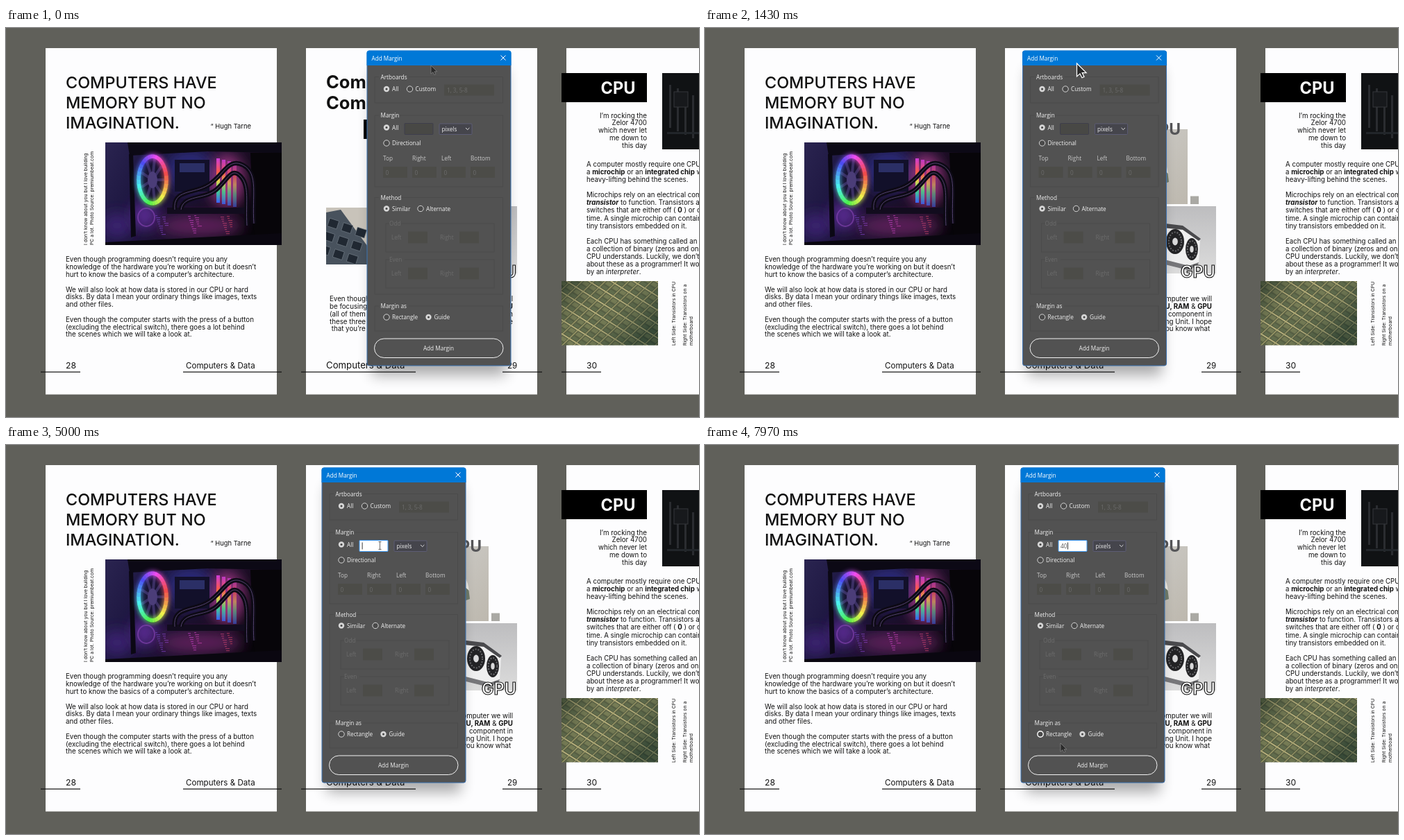
Recreate the animation shown at these times as an HTML page. Size 998 px wide and 561 px high, loop 8 s.

```html
<!DOCTYPE html>
<html lang="en">
<head>
<meta charset="utf-8">
<title>Add Margin</title>
<style>
  html, body { margin: 0; width: 100%; height: 100%; overflow: hidden; background: #60605a; }
  svg { display: block; font-family: Inter, sans-serif; font-optical-sizing: none; fill: #111; }
  .b { font-weight: 700; }
  .i { font-style: italic; }
  .m { font-weight: 500; }
  #dialog text { font-family: "Open Sans", "Noto Sans", sans-serif; font-size: 8.2px; font-weight: 500; fill: #f0f0f0; }
  #dialog text.dim { fill: #6c6c6c; }
  #dialog text.soft { fill: #c8c8c8; }
</style>
</head>
<body>
<svg id="stage" width="998" height="561" viewBox="0 0 998 561">
  <defs>
    <filter id="blur3" x="-50%" y="-50%" width="200%" height="200%"><feGaussianBlur stdDeviation="3"/></filter>
    <filter id="blur10" x="-50%" y="-50%" width="200%" height="200%"><feGaussianBlur stdDeviation="10"/></filter>
    <clipPath id="pcClip"><path d="M143 165H397V313H143z"/></clipPath>
    <clipPath id="boardClip"><path d="M461 259H560V341H461z"/></clipPath>
    <clipPath id="gpuClip"><path d="M600 257H736V354H600z"/></clipPath>
    <linearGradient id="pcBack" x2="1" y2=".3">
      <stop stop-color="#2a2450"/><stop offset=".3" stop-color="#1d1640"/>
      <stop offset=".75" stop-color="#1a0d24"/><stop offset="1" stop-color="#060409"/>
    </linearGradient>
    <linearGradient id="lamp" x2="0" y2="1">
      <stop stop-color="#d23ce0"/><stop offset=".3" stop-color="#ff5a4a"/>
      <stop offset=".5" stop-color="#f5d848"/><stop offset=".72" stop-color="#3fe08a"/>
      <stop offset="1" stop-color="#3b62ff"/>
    </linearGradient>
    <linearGradient id="ramBack" x2="1" y2="1"><stop stop-color="#cfcecb"/><stop offset="1" stop-color="#bdb8ae"/></linearGradient>
    <linearGradient id="gpuBack" x2="0" y2="1"><stop stop-color="#bdbdbf"/><stop offset="1" stop-color="#dcdcdc"/></linearGradient>
    <linearGradient id="waferShade" x2="1" y2=".6">
      <stop stop-color="#1d2a20" stop-opacity=".55"/><stop offset=".45" stop-color="#b9ae78" stop-opacity=".2"/>
      <stop offset="1" stop-color="#25382c" stop-opacity=".5"/>
    </linearGradient>
    <pattern id="wafer" width="12" height="17" patternUnits="userSpaceOnUse" patternTransform="rotate(32) skewX(-14)">
      <path fill="#3a4633" d="M0 0H12V17H0z"/><path fill="#66704d" d="M3 3H11V9H3z"/>
      <path fill="#4b5c42" d="M3 11H11V16H3z"/><path fill="#d0c68c" d="M0 0H12V1.6H0z"/>
      <path fill="#a3a06c" d="M0 0H1.4V17H0z"/>
    </pattern>
  </defs>
  <g id="document"></g>
  <g id="dialog"></g>
  <path id="arrow" d="M0 0V12.2L2.9 9.6 4.8 13.4 6.8 12.5 5 8.8H8.8z" fill="#2a2a2a"/>
  <path id="ibeam" d="M-2-5.5H2M0-5.5V5.5M-2 5.5H2" fill="none" stroke="#666"/>
</svg>
<script>
const $ = id => document.getElementById(id);
const text = (x, y, size, str, attrs = '') => `<text x="${x}" y="${y}" font-size="${size}" ${attrs}>${str}</text>`;
const rect = (x, y, w, h, fill, attrs = '') => `<rect x="${x}" y="${y}" width="${w}" height="${h}" fill="${fill}" ${attrs}/>`;
const line = (x1, x2) => rect(x1, 495.5, x2 - x1, 1.2, '#111');
const lines = (x, y, pitch, size, rows, attrs) =>
  rows.map((row, i) => row && text(x, y + i * pitch, size, row, attrs)).join('');
const sideways = (x, y, str) => text(0, 0, 6.85, str, `transform="translate(${x} ${y}) rotate(-90)"`);
const range = n => [...Array(n).keys()];
const END = 'text-anchor="end"';

// A ring of hue segments, seen at an angle
function rainbowRing(cx, cy, rx, ry, width, hue) {
  const at = a => `${cx + rx * Math.cos(a)} ${cy + ry * Math.sin(a)}`;
  return range(36).map(i => {
    const a = i * Math.PI / 18;
    return `<path d="M${at(a)}L${at(a + .2)}" stroke="hsl(${hue + i * 10} 85% 62%)" stroke-width="${width}"/>`;
  }).join('');
}

function computerPhoto() {
  const glow = (x, y, rx, ry, color) =>
    `<ellipse cx="${x}" cy="${y}" rx="${rx}" ry="${ry}" fill="${color}" filter="url(#blur10)"/>`;
  const tube = d => `<path d="${d}" fill="none" stroke="#0d0a15" stroke-width="6.5"/>
    <path d="${d}" fill="none" stroke="#54436f" stroke-width="1"/>`;
  const sparks = range(45).map(i => rect(215 + i * 47 % 140, 270 + i * 29 % 28, 3 + i % 4, 1.2,
    `hsl(${260 + i * 37 % 110} 50% 50%)`, 'opacity=".65"')).join('');
  const blades = range(9).map(i => {
    const a = i * Math.PI / 4.5;
    return `<path d="M211 219L${211 + 17 * Math.cos(a)} ${219 + 31 * Math.sin(a)}" stroke="#3a2f63" stroke-width="4"/>`;
  }).join('');
  return `<g clip-path="url(#pcClip)">${rect(143, 165, 254, 148, 'url(#pcBack)')}
    ${glow(160, 285, 22, 18, '#3b2470')}${glow(200, 270, 18, 20, '#5a2a92')}
    ${glow(265, 205, 35, 30, '#2c2a78')}${glow(318, 220, 24, 38, '#9a3580')}${glow(280, 285, 60, 14, '#5f235c')}
    <path d="M175 165H397V180L290 178L178 184z" fill="#0c0915"/>
    <path d="M177 182L183 181L187 300L180 302z" fill="#0b0814"/><path d="M352 180H397V313H358z" fill="#070509"/>
    <ellipse cx="211" cy="219" rx="22" ry="38" fill="#191433"/>${blades}
    <g filter="url(#blur3)" opacity=".8">${rainbowRing(211, 219, 20, 34, 8, 20)}</g>
    ${rainbowRing(211, 219, 20, 34, 5.5, 20)}
    <ellipse cx="211" cy="219" rx="7" ry="12" fill="#4b3d78"/>
    <ellipse cx="202" cy="273" rx="12" ry="13" fill="none" stroke="#8a48b8" stroke-width="2" opacity=".6"/>
    ${rect(243, 190, 50, 46, '#12102a')}${rect(250, 195, 36, 13, '#2b2f66')}
    ${[303, 311, 319, 327].map((x, i) => rect(x, 188 + i * 2, 5, 64, 'url(#lamp)', `opacity="${.95 - i * .15}"`)).join('')}
    ${sparks}${rect(232, 259, 112, 9, '#120c1e')}
    ${tube('M243 262C240 232 270 240 292 226S320 186 342 198S354 242 357 282')}
    ${tube('M252 262C255 240 286 248 303 233S325 200 338 214S345 250 347 285')}
    <path d="M143 309L397 296V313H143z" fill="#0a0710"/></g>`;
}

function boardPhoto() {
  const chips = range(9).map(i => rect(458 + i % 3 * 21, 283 + (i / 3 | 0) * 20, 14, 12, '#202832', 'stroke="#77818b" stroke-width=".6"')).join('');
  return `<g clip-path="url(#boardClip)">${rect(461, 259, 99, 82, '#c8c3ba')}
    <path d="M461 266L482 262L540 341H461z" fill="#48525d"/><g transform="rotate(18 490 305)">${chips}</g></g>`;
}

function gpuPhoto() {
  const fan = (x, y, rx, ry) => `<ellipse cx="${x}" cy="${y}" rx="${rx}" ry="${ry}" fill="#232325"/>
    <ellipse cx="${x}" cy="${y}" rx="${rx * .7}" ry="${ry * .75}" fill="none" stroke="#68686b" stroke-width="2" stroke-dasharray="2 2"/>
    <ellipse cx="${x}" cy="${y}" rx="${rx * .3}" ry="${ry * .3}" fill="#d9d9da"/>`;
  return `<g clip-path="url(#gpuClip)">${rect(600, 257, 136, 97, 'url(#gpuBack)')}
    <path d="M630 281L690 288L713 306L711 338L697 343L630 326z" fill="#efefef"/>
    <path d="M630 278L688 285L714 304L711 307L688 291L630 285z" fill="#4a4a4d"/>
    <path d="M630 326L697 343L711 338L709 343L695 349L630 333z" fill="#77777a"/>
    ${fan(677, 308, 13, 18)}${fan(701, 319, 9, 16)}</g>`;
}

function firstPage() {
  const body = ['Even though programming doesn’t require you any', 'knowledge of the hardware you’re working on but it doesn’t',
    'hurt to know the basics of a computer’s architecture.', '', 'We will also look at how data is stored in our CPU or hard',
    'disks. By data I mean your ordinary things like images, texts', 'and other files.', '',
    'Even though the computer starts with the press of a button', '(excluding the electrical switch), there goes a lot behind',
    'the scenes which we will take a look at.'];
  return rect(57, 29, 333, 499.5, '#fdfdfe')
    + lines(86, 87, 29.2, 23.4, ['COMPUTERS HAVE', 'MEMORY BUT NO', 'IMAGINATION.'], 'class="m"')
    + text(294.5, 145, 9.4, '“ Hugh Tarne')
    + computerPhoto()
    + sideways(116.5, 313, 'I don’t know about you but I love building')
    + sideways(125.5, 313, 'PC a lot. Photo Source: premiumbeat.com')
    + lines(86, 337.3, 10.8, 9.75, body)
    + text(86, 490.5, 12.2, '28') + line(50, 107)
    + text(259, 490.5, 11.6, 'Computers &amp; Data') + line(255, 397);
}

function secondPage() {
  return rect(432, 29, 333, 499.5, '#fdfdfe')
    + lines(461, 87, 29.8, 25.5, ['Computer', 'Components'], 'class="b"')
    + rect(515, 132, 60, 28, '#000')
    + boardPhoto()
    + rect(600, 146, 95, 108, 'url(#ramBack)')
    + '<path d="M640 180L666 206L668 222L640 232z" fill="#6f7b6a"/><path d="M655 176L665 200L667 210L655 200z" fill="#eeeae2"/>'
    + text(685, 154, 23, 'CPU', `class="b" ${END} fill="#555558"`)
    + rect(699, 242.5, 12, 11.5, '#aaa9a4')
    + gpuPhoto()
    + text(735, 360, 23.6, 'GPU', `class="b" ${END} fill="#f6f6f6" stroke="#111" stroke-width="1.1"`)
    + lines(466, 394.4, 10.7, 9.75, ['Even though', 'be focusing', '(all of them', 'these three', '&#160;that you’re'])
    + lines(730, 394.4, 10.7, 9.75, ['a computer we will', '<tspan class="b">CPU, RAM</tspan> &amp; <tspan class="b">GPU</tspan>',
      'component in', 'Processing Unit. I hope', 'you know what&#160;'], END)
    + text(461, 490.5, 13.2, 'Computers &amp; Data') + line(425, 590)
    + text(722, 490.5, 11.6, '29') + line(715, 772);
}

function thirdPage() {
  const body = ['A computer mostly require one CPU which', 'a <tspan class="b">microchip</tspan> or an <tspan class="b">integrated chip</tspan> which',
    'heavy-lifting behind the scenes.', '', 'Microchips rely on an electrical component',
    '<tspan class="b i">transistor</tspan> to function. Transistors are tiny', 'switches that are either off ( <tspan class="b">0</tspan> ) or on at any',
    'time. A single microchip can contain many', 'tiny transistors embedded on it.', '',
    'Each CPU has something called an instruction', 'a collection of binary (zeros and ones) that',
    'CPU understands. Luckily, we don’t need to care', 'about these as a programmer! It would be', 'by an <tspan class="i">interpreter</tspan>.'];
  const slots = range(4).map(i => rect(955 + i * 11, 82 + i * 5, 3, 62, '#2a2c30')).join('');
  return rect(807, 29, 200, 499.5, '#fdfdfe')
    + rect(800, 65, 123, 42, '#000') + text(906.5, 94.5, 23.6, 'CPU', `class="b" ${END} fill="#fff"`)
    + lines(923, 129.5, 10.8, 9.75, ['I’m rocking the', 'Zelor 4700', 'which never let', 'me down to', 'this day'], END)
    + rect(945, 65, 60, 110, '#101214') + slots + rect(962, 92, 20, 22, '#17191c', 'stroke="#34363a"')
    + rect(952, 150, 50, 3, '#22262a')
    + lines(836, 199.8, 11.1, 9.7, body)
    + rect(800, 365, 139, 92.5, 'url(#wafer)') + rect(800, 365, 139, 92.5, 'url(#waferShade)')
    + sideways(963.5, 458, 'Left Side: Transistors in CPU')
    + sideways(980, 458, 'Right Side: Transistors on a') + sideways(989, 458, 'motherboard')
    + text(836, 490.5, 12.2, '30') + line(800, 857);
}

// Dialog coordinates are measured from its left edge
const radios = [[28, 88, 'All', 1], [61.5, 88, 'Custom'], [28, 143.5, 'All', 1], [28, 166, 'Directional'],
  [28, 260.5, 'Similar', 1], [77, 260.5, 'Alternate'], [28, 417, 'Rectangle'], [88.5, 417, 'Guide', 1]];

function dialogMarkup() {
  const label = (x, y, str, cls = '') => text(x, y + 3, 8.2, str, `class="${cls}"`);
  const group = (x, y, w, bottom, name, cls) => rect(x, y, w, bottom - y, 'none', 'stroke="#4b4b4b"')
    + rect(x + 6, y - 2, name.length * 4.3 + 4, 4, '#525252') + label(x + (cls ? 5 : 8.5), y, name, cls);
  const field = (x, y, w, h = 16) => rect(x, y, w, h, '#4c4c48');
  const pair = y => label(35, y, 'Left', 'dim') + field(59, y - 8.5, 28, 17) + label(105, y, 'Right', 'dim') + field(133, y - 8.5, 28, 17);
  return rect(7, 60, 193, 441, '#000', 'opacity=".32" filter="url(#blur10)"')
    + rect(0, 33, 207, 454, '#525252', 'rx="3" stroke="#3d74b4"')
    + '<path d="M-.5 54V36Q-.5 32.5 3 32.5H204Q207.5 32.5 207.5 36V54z" fill="#0078d7"/>'
    + '<path d="M192.5 39.5L199.5 46.5M199.5 39.5L192.5 46.5" stroke="#fff"/>'
    + text(6.5, 46.5, 8.3, 'Add Margin', 'style="fill:#fff"')
    + group(11, 70.5, 184.5, 108, 'Artboards') + field(111, 81.5, 72) + label(115, 90, '1, 3, 5-8', 'dim')
    + group(11, 126, 184.5, 229, 'Margin')
    + '<rect id="input" x="54" y="137.5" width="41" height="16" rx="1"/>'
    + '<text id="typed" x="57" y="148.5" style="fill:#555"></text><path id="caret" d="M67.5 140.5V150.5" stroke="#222" stroke-width=".9"/>'
    + rect(104, 138, 47, 15.5, '#45454c', 'stroke="#5c5c74" rx="1"') + label(107.5, 145.5, 'pixels')
    + '<path d="M142 144L144.7 146.7L147.4 144" fill="none" stroke="#ddd"/>'
    + ['Top', 'Right', 'Left', 'Bottom'].map((name, i) => label(23 + 42 * i, 188, name, 'soft')
      + field(23 + 42 * i, 200, 35) + label(26.5 + 42 * i, 208.5, '0', 'dim')).join('')
    + group(11, 244.5, 184.5, 384, 'Method')
    + group(27, 282, 156, 323, 'Odd', 'dim') + pair(302) + group(27, 334, 156, 375, 'Even', 'dim') + pair(354)
    + group(11, 401, 184.5, 437, 'Margin as')
    + radios.map(([x, y, name, on], i) => `<circle id="radio${i}" cx="${x}" cy="${y}" r="4.2"/>`
      + (on ? `<circle cx="${x}" cy="${y}" r="1.5" fill="#444"/>` : '') + label(x + 8, y, name)).join('')
    + rect(10.5, 448, 185.5, 27.5, 'none', 'rx="13.75" stroke="#f2f2f2"')
    + text(103, 465, 8.2, 'Add Margin', 'text-anchor="middle"');
}

$('document').innerHTML = firstPage() + secondPage() + thirdPage();
$('dialog').innerHTML = dialogMarkup();

const ease = p => (p = Math.min(1, Math.max(0, p)), p * p * (3 - 2 * p));
const phase = (t, from, to) => ease((t - from) / (to - from));
const DRAG = [700, 1530];
const LOOP = 8000, FOCUS = 4700, TYPE_4 = 5300, TYPE_0 = 5700, BLINK = 530;

// time, x, y
const route = [[0, 612, 54], [600, 596, 51], [DRAG[0], 596, 51], [DRAG[1], 533, 51], [1650, 533, 51], [2090, 497, 91],
  [2700, 497, 91], [3250, 497, 149], [3950, 497, 149], [4500, 538.5, 145], [7000, 538.5, 145], [7900, 512, 430], [LOOP, 512, 430]];

function pointer(t) {
  const i = route.findIndex(stop => stop[0] > t);
  const [a, b] = [route[i - 1], route[i]];
  const p = phase(t, a[0], b[0]);
  return [a[1] + (b[1] - a[1]) * p, a[2] + (b[2] - a[2]) * p];
}

function draw(t) {
  const left = 520 - 65 * phase(t, ...DRAG);
  const [x, y] = pointer(t);
  $('dialog').setAttribute('transform', `translate(${left} 0)`);

  radios.forEach(([rx, ry, , on], i) => {
    const dx = x - left - rx;
    const hover = dx > -6 && dx < 31 && Math.abs(y - ry) < 13.5;
    const blue = i === 2 && t > 3400 && t < 4150;
    const color = blue ? '#3f9bf5' : hover ? '#fff' : '#d6d6d6';
    const radio = $('radio' + i);
    radio.setAttribute('fill', on ? color : '#4a4a4a');
    radio.setAttribute('stroke', on ? 'none' : color);
    radio.setAttribute('stroke-width', hover ? 1.4 : 1);
  });

  const focused = t >= FOCUS;
  $('input').setAttribute('fill', focused ? '#fff' : '#484845');
  $('input').setAttribute('stroke', focused ? '#3f9bf5' : '#3e3e4c');
  $('typed').textContent = t < TYPE_4 ? '' : t < TYPE_0 ? '4' : '40';
  const lastKey = t < TYPE_4 ? FOCUS : t < TYPE_0 ? TYPE_4 : TYPE_0;
  const shown = focused && Math.floor((t - lastKey) / BLINK) % 2 === 0;
  $('caret').setAttribute('opacity', shown ? 1 : 0);
  $('caret').setAttribute('transform', `translate(${4.7 * ($('typed').textContent.length - 2)} 0)`);

  const overInput = x > left + 54 && x < left + 95 && y > 137 && y < 154;
  const grip = phase(t, 450, 650) - phase(t, 1550, 1800);
  $('arrow').setAttribute('opacity', overInput ? 0 : 1);
  $('arrow').setAttribute('transform', `translate(${x} ${y}) scale(${1 + .55 * grip})`);
  $('arrow').setAttribute('stroke', grip > .5 ? '#fff' : '#8c8c8c');
  $('arrow').setAttribute('stroke-width', .7 + .1 * grip);
  $('ibeam').setAttribute('opacity', overInput ? 1 : 0);
  $('ibeam').setAttribute('transform', `translate(${x} ${y})`);
}

function tick() {
  draw(performance.now() % LOOP);
  requestAnimationFrame(tick);
}
tick();
</script>
</body>
</html>
```
